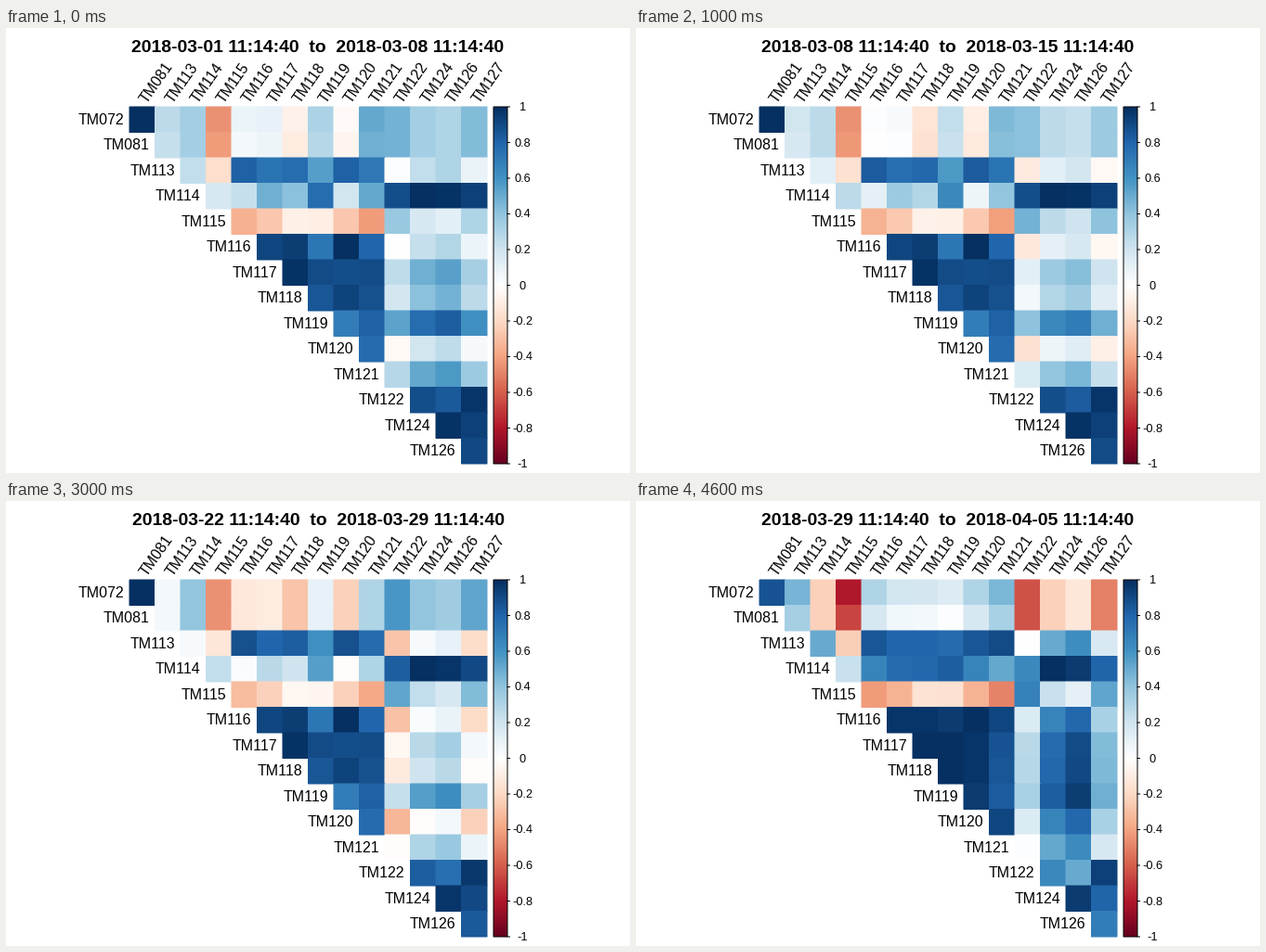
A matplotlib script that plays this animation: 672x480 px, repeating every 5 s.

```python
import matplotlib.pyplot as plt
import numpy as np
from matplotlib.animation import FuncAnimation
from matplotlib.colors import LinearSegmentedColormap
from matplotlib.patches import Rectangle

plt.rcParams["font.family"] = "Liberation Sans"

W, H, DPI = 672, 480, 100
PX = 72 / DPI
X0, Y0, CELL = 133, 85, 27.5
BAR_L, BAR_R, BAR_H = 525, 540, 385

STATIONS = [72, 81, *range(113, 123), 124, 126, 127]
N = len(STATIONS)
WEEKS = 5

# Stations fall into a pair, two clusters and one outsider.
A, B, C, D = [0, 1], [2, *range(5, 11)], [3, *range(11, 15)], [4]

# Traits in percent: how each B station relates to the other groups,
# and how far each C station leans from the middle of its cluster.
B_TO_C = np.array([18, 17, 42, 35, 70, 13, 45])
B_TO_C_LATE = np.array([36, 52, 63, 64, 68, 52, 37])
B_TO_A = np.array([26, 8, 10, -8, 31, -3, 51])
B_TO_D = np.array([-18, -36, -28, -9, -10, -28, -43])
C_LEAN = np.array([6, -15, 6, 11, -8])


def link(m, g, h, values):
    m[np.ix_(g, h)] = values
    m[np.ix_(h, g)] = np.transpose(values)


def closeness(trait, scale, own=0):
    """Correlation inside a cluster falls with the distance of the traits."""
    gap = np.abs(np.subtract.outer(trait, trait)) ** 1.5 / scale
    return 100 - gap - np.maximum.outer(own, own)


def correlations(w):
    """Slow drift at first, then a jump to another regime in the last week."""
    own = np.zeros(len(B))
    own[0] = 18 - 2 * w
    if w < WEEKS - 1:
        lean = C_LEAN * (1.1 + .045 * w * w)
        to_c = B_TO_C - 24 * np.sin(w * np.pi / 6)
        to_a = B_TO_A - 7 * w
        to_d = B_TO_D + 1.6 * w
        a_c = 38 + 4.8 * w * (w - 2.5) - .6 * lean
        d_c = 23 + 13 * np.sin(w * np.pi / 4) - .9 * lean
        pair, a_d, tilt, own[-1] = 99, -46, w - 3, 10
    else:
        lean = C_LEAN * 2.4
        to_c = B_TO_C_LATE
        to_a = 82 - to_c
        to_d = B_TO_D - 7
        a_c = -35 + .8 * lean
        d_c = 35 - .9 * lean
        pair, a_d, tilt, own[-1] = 86, -80, -13, 4

    m = np.zeros((N, N))
    link(m, A, A, pair)
    link(m, A, B, np.add.outer([0, tilt], to_a))
    link(m, A, C, [a_c, a_c])
    link(m, A, D, [[a_d], [a_d - tilt]])
    link(m, B, B, closeness(to_c, 14, own))
    link(m, B, C, np.add.outer(to_c, lean))
    link(m, D, B, [to_d])
    link(m, C, C, closeness(lean, 10))
    link(m, D, C, [d_c])
    return np.clip(m / 100, -1, 1)


LOWER = np.tri(N - 1, k=-1, dtype=bool)


def cells(w):
    return np.ma.array(correlations(w)[:-1, 1:], mask=LOWER)


def heading(w):
    start = np.datetime64("2018-03-01") + 7 * w
    return f"{start} 11:14:40  to  {start + 7} 11:14:40"


cmap = LinearSegmentedColormap.from_list("red_blue", [
    "#67001f", "#b2182b", "#d6604d", "#f4a582", "#fddbc7", "#ffffff",
    "#d1e5f0", "#92c5de", "#4393c3", "#2166ac", "#053061"], N=200)
SCALE = dict(cmap=cmap, vmin=-1, vmax=1)

fig = plt.figure(figsize=(W / DPI, H / DPI), dpi=DPI, facecolor="white")
ax = fig.add_axes([0, 0, 1, 1])


def label(x, y, text, px, **kw):
    kw = {"va": "center_baseline", "rotation_mode": "anchor", **kw}
    return ax.text(x, y, text, fontsize=px * PX, color="black", **kw)


steps = CELL * np.arange(N)
mesh = ax.pcolormesh(X0 + steps, Y0 + steps, cells(0), **SCALE,
                     edgecolors="face", linewidth=PX, antialiased=True,
                     snap=False)

ax.imshow(np.linspace(1, -1, 200)[:, None], **SCALE, aspect="auto",
          extent=(BAR_L, BAR_R, Y0 + BAR_H, Y0), interpolation="nearest")
ax.add_patch(Rectangle((BAR_L, Y0), BAR_R - BAR_L, BAR_H, fill=False,
                       ec="black", lw=PX, snap=False))
for k in range(11):
    y = Y0 + BAR_H * k / 10
    ax.plot([BAR_R, BAR_R + 2.5], [y, y], color="black", lw=PX, snap=False)
    label(556.5, y - .5, f"{(5 - k) / 5:g}", 12.8, ha="center")

for i in range(N - 1):
    left, middle = X0 + steps[i], CELL / 2
    label(left - 6, Y0 + steps[i] + middle - 1, f"TM{STATIONS[i]:03d}", 16,
          ha="right")
    label(left + middle, Y0 - 6.5, f"TM{STATIONS[i + 1]:03d}", 16,
          ha="left", rotation=55)

title = label(W / 2, 26, heading(0), 19.4, ha="center", va="baseline",
              weight="bold")

ax.set_xlim(0, W)
ax.set_ylim(H, 0)
ax.axis("off")


def update(w):
    mesh.set_array(cells(w))
    title.set_text(heading(w))
    return mesh, title


anim = FuncAnimation(fig, update, frames=WEEKS, interval=1000,
                     repeat=True, repeat_delay=0, blit=False)
plt.show()
```
